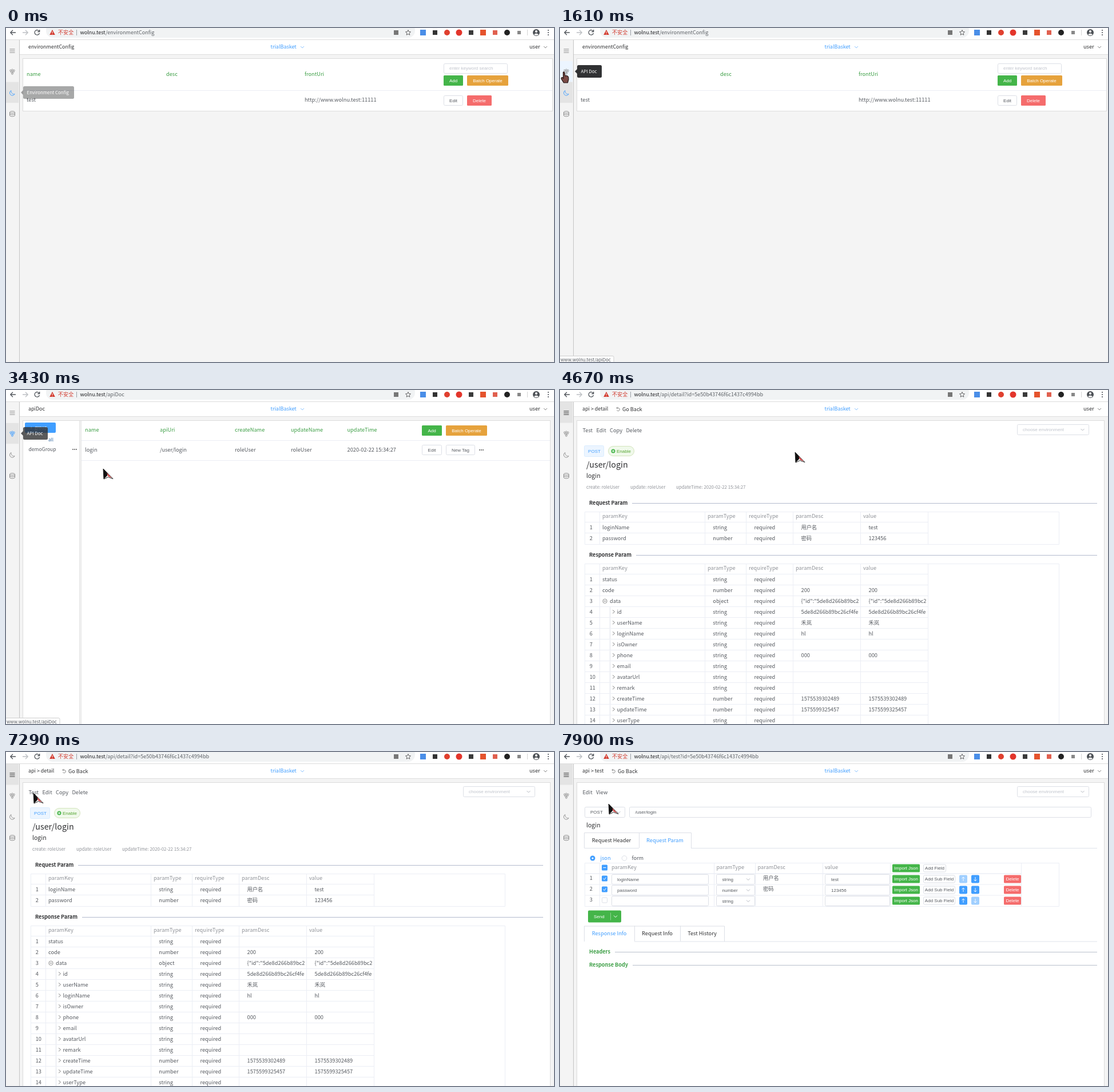
These frames come from a looping animation (958 by 585 pixels, 8 s). An HTML page:

```html
<!DOCTYPE html>
<html lang="en">
<head>
<meta charset="utf-8">
<title>API console</title>
<style>
html, body { margin: 0; width: 100%; height: 100%; overflow: hidden; background: #f4f4f4; }
svg { display: block; width: 958px; height: 585px; }
text { font: 9.25px "Noto Sans CJK SC", "Noto Sans CJK", "Noto Sans", sans-serif; fill: #565a60; white-space: pre; }
.ui { font: 8px "Liberation Sans", Arial, sans-serif; }
.small { font-size: 7.9px; }
.crumb { font-size: 8.9px; fill: #303133; }
.url { font-size: 9.1px; fill: #5f6368; }
.mid { text-anchor: middle; }
.bold { font-weight: 700; font-size: 9.1px; }
.head { fill: #909399; }
.green { fill: #3d9f46; }
.blue { fill: #409eff; }
.dark { fill: #303133; }

.anim { animation: 8s step-end infinite; }
#env { animation-name: env; }
#api { animation-name: api; }
#detail { animation-name: detail; }
#load { animation-name: load; }
#form { animation-name: form; }
#hoverItem { animation-name: hoverItem; }
#hoverApi { animation-name: hoverApi; }
#hoverField { animation-name: hoverField; }
#scroll { animation-name: scroll; }
#tipEnv { animation-name: tipEnv; }
#tipApi { animation-name: tipApi; }
#status { animation-name: status; }
#arrow { animation-name: arrow; }
#hand { animation-name: hand; }
#beam { animation-name: beam; }

@keyframes env { 0% { visibility: visible } 32.75%, 100% { visibility: hidden } }
@keyframes api { 0%, 55.875%, 100% { visibility: hidden } 32.75% { visibility: visible } }
@keyframes detail { 0%, 93.625%, 100% { visibility: hidden } 55.875% { visibility: visible } }
@keyframes load { 0%, 98.75%, 100% { visibility: hidden } 93.625% { visibility: visible } }
@keyframes form { 0% { visibility: hidden } 98.75%, 100% { visibility: visible } }
@keyframes hoverItem { 0%, 32.75%, 100% { opacity: 0 } 17.5% { opacity: 1 } }
@keyframes hoverApi { 0%, 55.875%, 100% { opacity: 0 } 50.75% { opacity: 1 } }
@keyframes hoverField { 0%, 78.625%, 100% { opacity: 0 } 70.875% { opacity: 1 } }
@keyframes scroll {
  0%, 86.125%, 100% { transform: none }
  63.375% { transform: translateY(-30px) }
  65.875% { transform: translateY(-85px) }
  68.375% { transform: translateY(-145px) }
  70.875% { transform: translateY(-200px) }
  73.5%, 76% { transform: translateY(-228px) }
  78.625% { transform: translateY(-190px) }
  81.125% { transform: translateY(-110px) }
  83.625% { transform: translateY(-35px) }
}
@keyframes tipEnv { 0% { opacity: .42 } 2.5% { opacity: .12 } 5%, 100% { opacity: 0 } }
@keyframes tipApi { 0%, 45.625%, 100% { opacity: 0 } 17.5% { opacity: .6 } 20.125% { opacity: 1 } 42.875% { opacity: .8 } }
@keyframes status { 0%, 45.625%, 100% { opacity: 0 } 17.5% { opacity: 1 } }
@keyframes arrow {
  0% { visibility: hidden }
  2.5% { visibility: visible; transform: translate(457px, 322px) }
  5% { visibility: visible; transform: translate(317px, 268px) }
  10% { visibility: visible; transform: translate(240px, 210px) }
  12.5% { visibility: visible; transform: translate(150px, 160px) }
  15% { visibility: visible; transform: translate(66px, 112px) }
  17.5% { visibility: hidden }
  37.75% { visibility: visible; transform: translate(50px, 94px) }
  40.25% { visibility: visible; transform: translate(115px, 120px) }
  42.875% { visibility: visible; transform: translate(170px, 138px) }
  45.625% { visibility: visible; transform: translate(235px, 142px) }
  48.125% { visibility: visible; transform: translate(330px, 126px) }
  50.75% { visibility: visible; transform: translate(411px, 109px) }
  63.375% { visibility: visible; transform: translate(380px, 138px) }
  65.875% { visibility: visible; transform: translate(330px, 168px) }
  68.375% { visibility: hidden }
  83.625% { visibility: visible; transform: translate(190px, 150px) }
  86.125% { visibility: visible; transform: translate(120px, 110px) }
  88.625% { visibility: visible; transform: translate(66px, 82px) }
  91.125% { visibility: visible; transform: translate(48px, 72px) }
  93.625% { visibility: visible; transform: translate(53px, 76px) }
  96.125% { visibility: visible; transform: translate(66px, 84px) }
  98.75%, 100% { visibility: visible; transform: translate(85px, 91px) }
}
@keyframes hand {
  0%, 37.75%, 100% { visibility: hidden }
  17.5% { visibility: visible; transform: translate(5px, 80px) }
  20.125% { visibility: visible; transform: translate(1px, 76px) }
}
@keyframes beam {
  0%, 83.625%, 100% { visibility: hidden }
  68.375% { visibility: visible; transform: translate(292px, 188px) }
  70.875% { visibility: visible; transform: translate(273px, 195px) }
  81.125% { visibility: visible; transform: translate(245px, 180px) }
}
</style>
</head>
<body>
<script>
const HOST = 'wolnu.test', USER = 'roleUser', ID = '5e50b43746f6c1437c4994bb';
const GREEN = '#44b549', ORANGE = '#e6a23c', RED = '#f56c6c', BLUE = '#409eff', RULE = '#ebeef5', EDGE = '#dcdfe6';

const text = (x, y, s, cls = '', o = '') => `<text x="${x}" y="${y}" dy=".37em" class="${cls}" ${o}>${s}</text>`;
const rect = (x, y, w, h, fill, o = '') => `<rect x="${x}" y="${y}" width="${w}" height="${h}" fill="${fill}" ${o}/>`;
const path = (d, stroke = RULE, o = '') => `<path d="${d}" fill="none" stroke="${stroke}" ${o}/>`;
const dot = (x, y, r, fill, o = '') => `<circle cx="${x}" cy="${y}" r="${r}" fill="${fill}" ${o}/>`;
const group = (id, body) => `<g id="${id}" class="anim">${body}</g>`;
const chevron = (x, y, c = '#b4b8c0') => path(`M${x - 3} ${y - 1.5}l3 3 3-3`, c);
const more = (x, y) => [-3, 0, 3].map(d => dot(x + d, y, 1, '#555')).join('');
const box = (x, y, w, h) => rect(x + .5, y + .5, w - 1, h - 1, '#fff', `stroke="${EDGE}" rx="2"`);
const button = (x, y, w, h, label, fill) => (fill ? rect(x, y, w, h, fill, 'rx="1.5"') : box(x, y, w, h))
  + text(x + w / 2, y + h / 2, label, 'ui mid', fill ? 'style="fill:#fff"' : '');
const panel = (right, bottom) => rect(29.5, 53.5, right - 29.5, bottom - 53.5, '#fff', 'stroke="#dcdcdc"');
const url = rest => text(129.5, 7.5, `<tspan fill="#202124">${HOST}</tspan>/${rest}`, 'url');
const section = (x, y, label, from, to, cls = 'dark') => text(x, y + .6, label, 'bold ' + cls)
  + path(`M${from} ${y + 1.5}H${to}`, cls == 'dark' ? '#b3bacd' : '#b9c0cc');
const back = x => path(`M${x + 1} 31.5h3a2.6 2.6 0 1 1-2.6 3.8M${x + 2.6} 29.8l-1.8 1.7 1.8 1.7`, '#666', 'stroke-width=".8"')
  + text(x + 11, 33.5, 'Go Back', 'crumb', 'style="font-size:9.1px"');

// Side menu with one active item
const icons = [
  c => path('M6.5 37h9M6.5 40h9M6.5 43h9', c, 'stroke-width="1.2"'),
  c => [[8, 74.5], [11, 73.5], [14, 74.5], [9.5, 77], [12.5, 77], [11, 80]]
    .map(([x, y]) => dot(x, y, 1.4, 'none', `stroke="${c}" stroke-width=".8"`)).join(''),
  c => path('M9 109.5a4.6 4.6 0 1 0 6.2 6.2a5.2 5.2 0 0 1-6.2-6.2z', c, 'stroke-width=".9"'),
  c => path('M6.5 147.5v5.5c0 2.5 9 2.5 9 0v-5.5M6.5 150c0 2.5 9 2.5 9 0', c)
    + `<ellipse cx="11" cy="147.5" rx="4.5" ry="1.7" fill="none" stroke="${c}"/>`
];
const side = (active, color) => rect(0, 21 + active * 36.8, 22, 36.5, '#e4e4e4')
  + icons.map((f, i) => f(i == active ? color : '#8b8b8b')).join('');

const browser = () => rect(0, 0, 958, 20, '#fff') + path('M0 20.5H958', '#dcdcdc')
  + rect(70, -8, 645, 25, '#f1f3f4', 'rx="12"')
  + path('M17 8H8M12 3.8L7.8 8l4.2 4.2', '#50545a', 'stroke-width="1.3"')
  + path('M29 8h9M34 3.8L38.2 8 34 12.2', '#bcbfc3', 'stroke-width="1.3"')
  + path('M58 5.5a4.3 4.3 0 1 0 .5 3.5M58.7 3v3.5h-3.5', '#50545a', 'stroke-width="1.3"')
  + '<path d="M81 3l4.8 9h-9.6z" fill="#d23b2f"/><path d="M81 6v3M81 10v1" stroke="#fff"/>'
  + text(91, 7.5, '不安全', 'url', 'style="fill:#d23b2f"') + path('M123.5 3v10', '#9aa0a6')
  + rect(678, 4, 8, 8, '#777')
  + path('M703 3.5l1.3 3 3.2.3-2.4 2.2.7 3.2-2.8-1.7-2.8 1.7.7-3.2-2.4-2.2 3.2-.3z', '#555', 'stroke-width=".9"')
  + rect(724, 3, 10, 10, '#4a8ee8') + rect(746, 4, 8, 8, '#333') + dot(771, 8, 5, '#e0402f')
  + dot(792, 8, 5.5, '#e3352b') + rect(809, 4, 8, 8, '#3a3a3a') + rect(829, 3, 10, 10, '#e5532d')
  + rect(851, 4, 8, 8, '#e0604f') + dot(876, 8, 5, '#222') + rect(894, 5, 6, 6, '#888')
  + path('M911.5 3v10', '#d5d5d5') + dot(927, 8, 6, '#4d5156') + dot(927, 6, 2, '#fff')
  + '<path d="M923 11.5q4-4 8 0q-4 3-8 0z" fill="#fff"/>'
  + [4, 8, 12].map(y => dot(948, y, 1.1, '#50545a')).join('');

const frame = () => rect(0, 0, 958, 585, '#f4f4f4') + browser()
  + rect(24, 21, 934, 25, '#fff') + path('M24 46.5H958', '#dedede') + path('M23.5 21V585', '#c4c4c4')
  + text(462.5, 33, 'trialBasket', 'blue', 'style="font-size:9px"') + chevron(518, 33.5, '#8ec5ff')
  + text(915, 33, 'user', 'dark') + chevron(943, 33.5, '#888');

const envPage = () => url('environmentConfig') + text(39, 33, 'environmentConfig', 'crumb')
  + group('hoverItem', rect(0, 58, 22, 36.5, '#ecf5ff')) + side(2, BLUE)
  + panel(955.5, 145.5) + path('M30 109.5H955')
  + [[36, 'name'], [280, 'desc'], [522, 'frontUri']].map(([x, s]) => text(x, 81, s, 'green')).join('')
  + box(765, 62, 112, 18) + text(775, 70.5, 'enter keyword search', 'ui', 'style="fill:#c0c4cc"')
  + button(765, 83, 34, 18, 'Add', GREEN) + button(806, 83, 72, 18, 'Batch Operate', ORANGE)
  + text(36, 126, 'test') + text(522, 126, `http://www.${HOST}:11111`)
  + button(765, 118, 34, 18, 'Edit') + button(806, 118, 43, 18, 'Delete', RED);

const apiPage = () => url('apiDoc') + text(39, 33, 'apiDoc', 'crumb') + side(1, BLUE)
  + panel(951.5, 600) + rect(128, 54, 3, 531, '#f1f1f1') + path('M128.5 54V585M131.5 54V585', '#e6e6e6')
  + rect(33, 57, 54, 18, BLUE, 'rx="2"') + text(42, 66, '+  group', 'small', 'style="fill:#fff"')
  + text(74, 87, 'all', 'small', 'style="fill:#3a6ea5"') + text(39.5, 104, 'demoGroup', '', 'style="font-size:8.6px"') + more(120, 104)
  + group('hoverApi', rect(132, 89, 819, 34, '#f5f7fa')) + path('M132 88.5H951M132 123.5H951')
  + [[138, 'name', 'login'], [269, 'apiUri', '/user/login'], [400, 'createName', USER], [498, 'updateName', USER],
    [596.5, 'updateTime', '2020-02-22 15:34:27']].map(([x, h, v]) => text(x, 70, h, 'green') + text(x, 104.5, v)).join('')
  + button(727, 62, 35, 18, 'Add', GREEN) + button(769, 62, 72, 18, 'Batch Operate', ORANGE)
  + button(727, 96, 35, 18, 'Edit') + button(769, 96, 51, 18, 'New Tag') + more(831, 105);

const choose = x => box(x, 60, 126, 19) + text(x + 10, 69.5, 'choose environment', 'ui', 'style="fill:#c0c4cc"') + chevron(x + 114.5, 69.5);

// key, type, description, value; a leading ">" marks a nested field
const request = ['loginName|string|用户名|test', 'password|number|密码|123456'];
const hash = '5de8d266b89bc26cf4fe';
const response = ['status', 'code|number|200', 'data|object|{"id":"5de8d266b89bc2', `>id||${hash}`, '>userName||禾岚', '>loginName||hl',
  '>isOwner', '>phone||000', '>email', '>avatarUrl', '>remark', '>createTime|number|1575539302489',
  '>updateTime|number|1575599325457', '>userType', '>projectUserId', '>auth||a2f21ca4-f1f5-4597-ad1',
  '>createId||5de8d00db54ec31d2c5', '>createName||owner', `>updateId||${hash}`, '>updateName||禾岚', 'message'];

function table(top, list) {
  const end = top + 19 * (list.length + 1);
  let out = path(`M43.5 ${top}V${end}H872.5V${top}z`);
  out += [69.5, 253.5, 325.5, 407.5, 525.5, 643.5].map(x => path(`M${x} ${top}V${end}`)).join('');
  out += [[74, 'paramKey'], [258, 'paramType'], [330, 'requireType'], [412, 'paramDesc'], [530, 'value']]
    .map(([x, s]) => text(x, top + 7.5, s, 'head')).join('');
  list.forEach((line, i) => {
    const [key, type, desc = '', value = desc] = line.split('|'), y = top + 26.8 + 19 * i;
    const nested = key[0] == '>', parent = type == 'object';
    out += path(`M43 ${top + 18 + 19 * i}H643`);
    if (nested) out += path(`M92 ${y - 3}l3.5 3-3.5 3`, '#777', 'stroke-width=".9"') + path(`M87.5 ${y - 8}v18`, '#dfe3ea');
    if (parent) out += dot(78.5, y + .5, 3.7, 'none', 'stroke="#777" stroke-width=".8"') + path(`M76.5 ${y + .5}h4`, '#777');
    out += text(51.7, y, i + 1) + text(nested ? 99.5 : parent ? 87 : 74, y, key.replace('>', ''))
      + text(267.3, y, type || 'string') + text(339.5, y, 'required') + text(421.5, y, desc) + text(539.5, y, value);
  });
  return out;
}

const detailBody = () => panel(951.5, 809.5)
  + [[39.5, 'Test'], [63.5, 'Edit'], [87, 'Copy'], [115.5, 'Delete']].map(([x, s]) => text(x, 71, s)).join('') + choose(799)
  + rect(42.5, 97.5, 34, 19, '#ecf5ff', 'rx="2" stroke="#d9ecff"') + text(60, 107, 'POST', 'ui mid blue')
  + rect(84.5, 98.5, 45, 17, '#f0f9eb', 'rx="8.5" stroke="#d4e4bd"') + dot(93, 107, 3.5, GREEN) + path('M91 107h4M93 105v4', '#fff')
  + text(99, 107, 'Enable', 'ui', 'style="fill:#55a532"')
  + text(46, 130.7, '/user/login', 'dark', 'style="font-size:14.3px"') + text(46, 150.6, 'login', 'dark', 'style="font-size:10.5px"')
  + [[46, `create: ${USER}`], [123, `update: ${USER}`], [203, 'updateTime: 2020-02-22 15:34:27']]
    .map(([x, s]) => text(x, 170, s, 'small head')).join('')
  + section(51, 197, 'Request Param', 126, 939) + table(213.5, request)
  + section(51, 288, 'Response Param', 133, 939)
  + group('hoverField', rect(43, 417, 600, 19, '#f3f5f9')) + table(304.5, response)
  + section(51, 740.4, 'Success Example', 134, 491, 'green')
  + section(498.5, 740.4, 'Failure Example', 577, 939, '" style="fill:#e8705f')
  + rect(497, 757, 435, 32.5, '#e4e7f1', 'rx="2"');

const detailPage = () => url('api/detail?id=' + ID) + text(39, 33, 'api &gt; detail', 'crumb') + back(98) + side(0, '#333')
  + `<g clip-path="url(#view)">${group('scroll', detailBody())}</g>`;

const tabs = (y, labels, edges, active, right) => path(`M43 ${y + 27.5}H${right}`, '#dfe3ea')
  + rect(edges[active], y + 1, edges[active + 1] - edges[active], 28, '#fff')
  + path(`M${edges[0] + .5} ${y + 27.5}V${y + .5}H${edges[edges.length - 1] + .5}V${y + 27.5}`, EDGE)
  + edges.slice(1, -1).map(x => path(`M${x + .5} ${y}v27`, EDGE)).join('')
  + labels.map((s, i) => text((edges[i] + edges[i + 1]) / 2, y + 13.5, s, 'mid ' + (i == active ? 'blue' : 'dark'))).join('');

const check = (y, mark) => mark
  ? rect(73, y - 5, 10, 10, BLUE, 'rx="1.5"') + path(mark == '-' ? `M75.5 ${y}h5` : `M75.5 ${y}l2 2 3-4`, '#fff')
  : rect(73.5, y - 4.5, 9, 9, '#fff', `rx="1.5" stroke="${EDGE}"`);
const arrowKey = (x, y, up, on) => rect(x, y - 7, 14, 14, on ? BLUE : '#a0cfff', 'rx="2"')
  + path(up ? `M${x + 7} ${y + 3.5}v-7l-2.5 2.5m2.5-2.5l2.5 2.5` : `M${x + 7} ${y - 3.5}v7l-2.5-2.5m2.5 2.5l2.5-2.5`, '#fff', 'stroke-width=".9"');

function fieldRow(i, key, type, desc, value) {
  const y = 222.5 + 19 * i;
  return path(`M43 ${y - 9.5}H806`) + text(51.7, y - 1.5, i + 1) + check(y - 1, key && 'v')
    + box(90, y - 8.5, 170, 18) + text(100, y + .5, key, 'ui')
    + box(273, y - 8.5, 68, 18) + text(283.5, y + .5, type, 'ui') + chevron(329, y + .5)
    + text(355, y - 1.5, desc) + box(463, y - 8.5, 114, 18) + text(474, y + .5, value, 'ui')
    + button(581, y - 7, 48, 14, 'Import Json', GREEN) + button(635, y - 7, 56, 14, 'Add Sub Field')
    + arrowKey(698, y, true, i > 0) + arrowKey(719, y, false, i < 2) + button(776, y - 7, 30, 14, 'Delete', RED);
}

function testPage(full) {
  const right = full ? 939 : 942, dy = full ? 23 : 0, low = full ? 40.5 : 0, top = 171.5 + dy, end = full ? 270.5 : 230.5;
  return url('api/test?id=' + ID) + text(39, 33, 'api &gt; test', 'crumb') + back(90) + side(0, '#333')
    + panel(full ? 951.5 : 955.5, full ? 600 : 579.5)
    + text(39.5, 71, 'Edit') + text(63, 71, 'View') + choose(full ? 799 : 802)
    + box(43, 96, full ? 71 : 72, 19) + text(53, 105.5, 'POST', 'ui') + chevron(102.5, 105.5)
    + (full ? box(121, 96, 808, 19) : box(122, 96, 811, 19)) + text(full ? 131.5 : 132, 105.5, full ? '/user/login' : '/', 'ui')
    + (full ? text(46, 128.5, 'login', 'dark', 'style="font-size:10.5px"') : '')
    + tabs(118 + dy, ['Request Header', 'Request Param'], [42, 138, 229], 1, right)
    + dot(57, 163 + dy, 4.5, BLUE) + dot(57, 163 + dy, 1.6, '#fff') + text(70.5, 163 + dy, 'json', 'blue')
    + dot(112.5, 163 + dy, 4.3, '#fff', `stroke="${EDGE}"`) + text(125.5, 163 + dy, 'form')
    + path(`M43.5 ${top}H872.5V${end}H43.5z`) + path(`M43 ${top + 18.5}H806`)
    + [69.5, 269.5, 341.5, 459.5, 577.5, 806.5].map(x => path(`M${x} ${top}V${full ? end : top + 18.5}`)).join('')
    + check(179.5 + dy, full && '-')
    + [[90, 'paramKey'], [273.5, 'paramType'], [345.5, 'paramDesc'], [463, 'value']].map(([x, s]) => text(x, 179 + dy, s, 'head')).join('')
    + button(581, 173.5 + dy, 48, 14, 'Import Json', GREEN) + button(635, 173.5 + dy, 40, 14, 'Add Field')
    + (full ? fieldRow(0, 'loginName', 'string', '用户名', 'test') + fieldRow(1, 'password', 'number', '密码', '123456') + fieldRow(2, '', 'string', '', '')
      : text(425, 210.5, '暂无数据', 'mid head'))
    + rect(49, 237 + low, 58, 21, GREEN, 'rx="2"') + text(59, 247.5 + low, 'Send', 'ui', 'style="fill:#fff"')
    + path(`M88.5 ${241 + low}v13`, '#8fd392') + chevron(97, 247.5 + low, '#fff')
    + tabs(264 + low, ['Response Info', 'Request Info', 'Test History'], [42, 130, 210, 287], 0, right)
    + section(51, 308.5 + low, 'Headers', 96, right, 'green') + section(51, 331.5 + low, 'Response Body', 127, right, 'green')
    + (full ? '' : rect(0, 21, 958, 564, 'rgba(0,10,5,.108)') + dot(479, 294, 4, 'none', 'stroke="#d8e0e8" stroke-dasharray="2 1.5"')
      + text(477, 305, 'Loading', 'mid', 'style="fill:#d2dde8"'));
}

const tip = (y, w, label, o = '') => `<path d="M26 ${y}l4-4v8z" fill="#303133"/>` + rect(30, y - 11, w, 22, '#303133', 'rx="2.5"')
  + text(36.5, y + .5, label, 'small', `style="fill:#fff;${o}"`);

const arrow = '<path d="M0 0L17 17.5 8.5 14.5 1 18z" fill="#fff" stroke="#111" stroke-width=".9"/>'
  + '<path d="M0 0L8 8.5 7 12 1 18z" fill="#111"/><path d="M6 7L15 16 8.5 13z" fill="#d8383a"/>';
const handPath = 'M4.5 1.5q1.5-1.5 2.5.5l1 6 2-.7 2 .7 1.7 1.7.3 4.3-1.5 6h-7L1.5 13.5q-1-3 1.5-3l1.8 1.5z';
const hand = `<path d="${handPath}" stroke="#fff" stroke-width="2.5"/><path d="${handPath}" fill="#7a4944" stroke="#1c1414" stroke-width="1.2"/>`;
const beam = path('M-2.5-5h5M0-5v11M-1.5 6h3', '#2b6b45', 'stroke-width="1.2"');

document.body.innerHTML = '<svg viewBox="0 0 958 585"><clipPath id="view"><path d="M24 47H958V585H24z"/></clipPath>'
  + frame()
  + group('env', envPage()) + group('api', apiPage()) + group('detail', detailPage())
  + group('load', testPage(false)) + group('form', testPage(true))
  + group('tipEnv', tip(113, 89, 'Environment Config', 'font-weight:500')) + group('tipApi', tip(76, 43, 'API Doc'))
  + group('status', rect(-1, 574.5, 95, 12, '#fff', 'rx="2" stroke="#cfcfcf"') + text(1, 581, `www.${HOST}/apiDoc`, 'small'))
  + group('arrow', arrow) + group('hand', hand) + group('beam', beam) + '</svg>';
</script>
</body>
</html>
```
